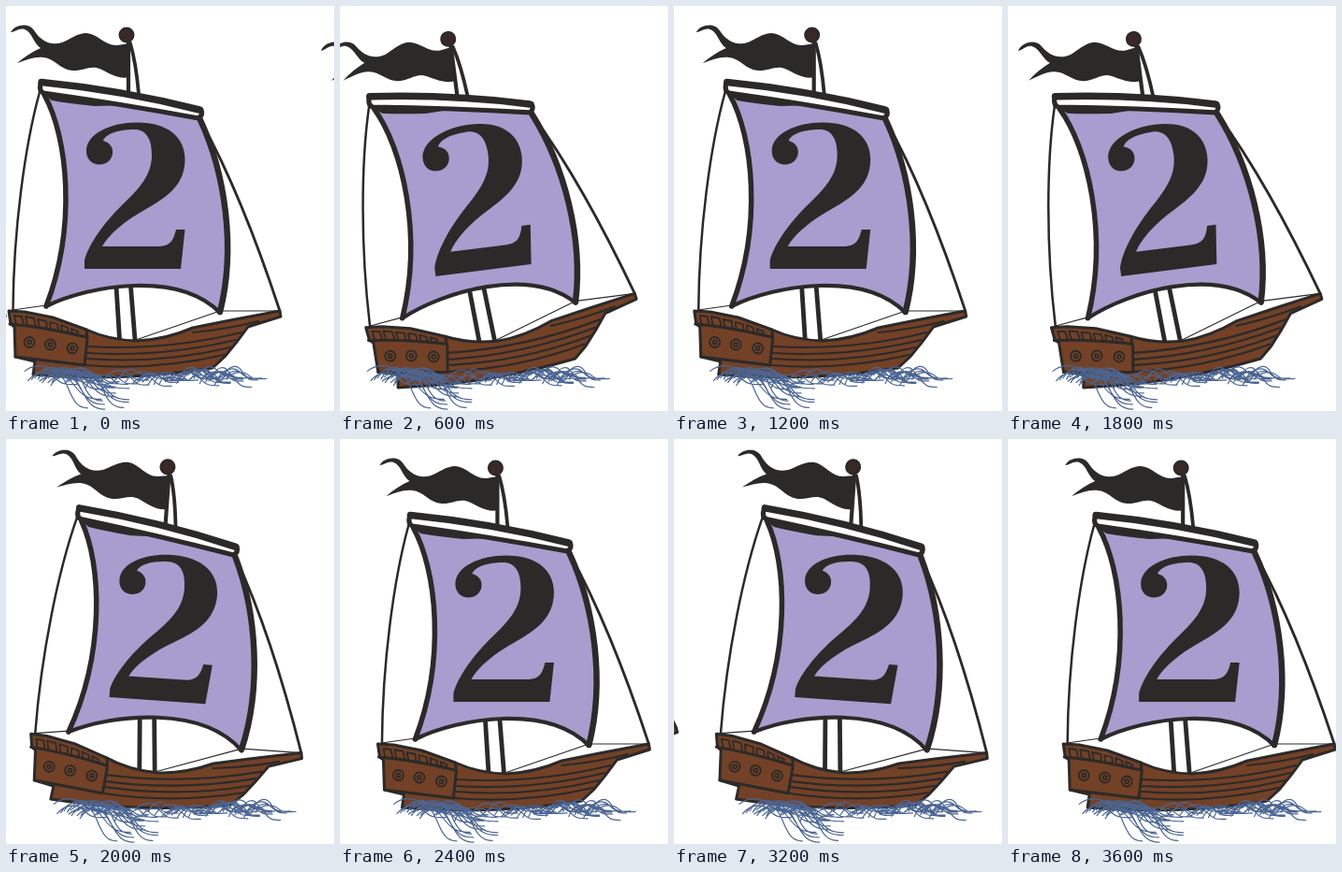
Write an HTML page that moves like this. It is 351 px wide and 433 px high and loops after 3800 ms.

```html
<!DOCTYPE html>
<html lang="en">
<head>
<meta charset="utf-8">
<title>Rocking ship</title>
<style>
html, body { margin: 0; width: 100%; height: 100%; overflow: hidden; background: #fff; }
svg { display: block; width: 100%; height: 100%; }
.line { fill: none; stroke: #2b2a29; stroke-linecap: round; stroke-linejoin: round; }
.ink { fill: #2b2a29; }
.wood { fill: #734126; stroke: #2b2a29; stroke-width: 3; stroke-linejoin: round; }
</style>
</head>
<body>
<svg viewBox="0 0 351 433" role="img" aria-label="Sailing ship with the number 2 on its sail">
  <defs>
    <g id="ship">
      <!-- rigging -->
      <path class="line" stroke-width="2.5" d="M36 92C20 150 8 240 7.500 325"/>
      <path class="line" stroke-width="2.8" d="M209 124C239 178 268 250 293 326"/>
      <path class="line" stroke-width="1.200" d="M7 325L43 320M230 326H293M139 357L229 326"/>
      <!-- mast -->
      <path fill="#fff" d="M118 300L122 358H138L133 300Z"/>
      <path class="line" stroke-width="4.800" d="M118 300L121.500 356M133.500 300L138 357"/>
      <path class="line" stroke-width="4.200" d="M131 38V93"/>
      <path class="line" stroke-width="3.800" d="M133 40Q139 60 142 94"/>
      <!-- flag -->
      <path class="ink" d="M5 28C9 20 24 17 30 26C37 37 47 43 60 39C68 36 76 29 86 29C98 29.500 106 43 119 42L132 40V76C121 79 111 72 100 67C90 63 82 70 71 69C58 68 52 56 40 55C30 54 22 58 12 61C19 55 28 49 37 45C30 41 28 28 20 25C14 23 10 28 5 28Z"/>
      <circle class="ink" cx="129" cy="31" r="8.500"/>
      <circle cx="129" cy="31" r="6" fill="#3a2827"/>
      <!-- sail -->
      <path fill="#a89dce" d="M41 95C66 140 76 235 43 321C90 298 185 283 229 328C246 260 235 180 208 120Q120 106 41 95Z"/>
      <path class="line" stroke-width="5.500" d="M41 95C66 140 76 235 43 321"/>
      <path class="line" stroke-width="4.200" d="M43 321C90 298 185 283 229 328"/>
      <path class="line" stroke-width="6.500" d="M229 327C246 260 235 180 208 122"/>
      <!-- yard -->
      <path fill="#fff" d="M37 82Q130 92 209 111L207 120Q120 106 40 93Z"/>
      <path class="line" stroke-width="7.500" d="M38 81.500Q125 90 207 111"/>
      <path class="line" stroke-width="5.200" d="M37 83Q35 91 40 93Q125 105 206 120Q211 117 209 111"/>
      <path class="ink" d="M40 94Q85 99 130 106L95 107Q65 104 49 101Z"/>
      <!-- numeral -->
      <path class="ink" d="M86 155C86 136 113 124.500 140 124.500C173 124.500 191.500 140 191.500 164C191.500 192 171 205 150 217C128 229 110 244 103 257H162C176 257 179 251 182 239H191.500L187 281H84V272C88 256 103 234 123 214C143 195 156 181 156 159C156 142 150 132 137 132C122 132 107 136 104 144C111 146 115 151 114 158C113 165 107 169.500 100 169.500C91 169.500 86 163 86 155Z"/>
      <!-- hull -->
      <path class="wood" d="M3 326L20 327L50 333L86 346Q110 357 140 358Q170 357 200 344L240 336L293 326L294 332L259 343Q247 360 234 375L221 387Q140 400 60 396L29 394L31 380L10 375L9 343L5 340Z"/>
      <path class="line" stroke-width="2.200" d="M87 364Q170 369 252 349M87 371Q165 376 246 357M87 377Q165 383 240 365M86 384Q160 390 233 373M200 349Q240 345 270 337"/>
      <path class="line" stroke-width="3" d="M4 340Q40 343 86 354M86 346L87 356L84 383M10 375L84 384"/>
      <g class="line" stroke-width="1.800">
        <path d="M9 331L17 332L19 341H11ZM21 332L30 334L32 343L23 342ZM34 335L43 337L44 345L36 344ZM47 338L55 340L56 347L48 346ZM59 341L66 344L67 349L60 348ZM70 345L77 348V351L71 350Z"/>
        <circle cx="25" cy="359.500" r="5.500"/><circle cx="47.500" cy="362" r="5.500"/><circle cx="71" cy="366" r="5.500"/>
        <circle cx="25" cy="359.500" r="2"/><circle cx="47.500" cy="362" r="2"/><circle cx="71" cy="366" r="2"/>
      </g>
    </g>
    <path id="waves" fill="none" stroke="#4b6592" stroke-width="1.200" stroke-linecap="round"/>
  </defs>
  <g id="strip"></g>
</svg>
<script>
const WIDTH = 351, FRAME_MS = 200, FRAMES = 19, DRIFT = 3.12;
const TILTS = [0, -7.2, -12.3, -7.2, 4, 11];

let seed = 11;
const rand = (low, high) => {
  seed = (seed * 16807) % 2147483647;
  return low + (high - low) * seed / 2147483647;
};

// Fans of strands: each rises to a crest, sweeps down and levels out to the right.
function strands(count, x0, x1, crest, length, drop) {
  let d = '';
  for (let i = 0; i < count; i++) {
    const x = x0 + (x1 - x0) * i / (count - 1);
    const top = crest + rand(-3, 5);
    const run = length * rand(0.75, 1.1);
    const end = top + drop * rand(0.4, 1);
    const at = (u, y) => `${(x + run * u).toFixed(1)} ${y.toFixed(1)} `;
    d += 'M' + at(0, top + rand(5, 13)) +
      'C' + at(0.15, top - 1) + at(0.4, top - 3) + at(0.55, top + (end - top) * 0.4) +
      'S' + at(0.8, end) + at(1, end);
  }
  return d;
}

document.getElementById('waves').setAttribute('d',
  strands(12, 20, 60, 388, 58, 18) +
  strands(13, 36, 72, 389, 64, 40) +
  strands(10, 85, 150, 392, 45, 11) +
  strands(10, 140, 195, 392, 42, 9) +
  strands(18, 182, 236, 388, 42, 15));

// Adjacent frames share one wide strip, so overhanging parts reach the next frame.
const strip = document.getElementById('strip');
const addUse = id => {
  const use = document.createElementNS('http://www.w3.org/2000/svg', 'use');
  use.setAttribute('href', '#' + id);
  return strip.appendChild(use);
};
const boats = [-1, 0, 1].map(offset => ({ offset, ship: addUse('ship'), waves: addUse('waves') }));

function draw() {
  const frame = Math.floor(performance.now() / FRAME_MS) % FRAMES;
  for (const { offset, ship, waves } of boats) {
    const n = (frame + offset + FRAMES) % FRAMES;
    const move = `translate(${offset * WIDTH + n * DRIFT} 0)`;
    ship.setAttribute('transform', `${move} rotate(${TILTS[n % TILTS.length]} 152 213)`);
    waves.setAttribute('transform', move);
  }
  requestAnimationFrame(draw);
}
draw();
</script>
</body>
</html>
```
